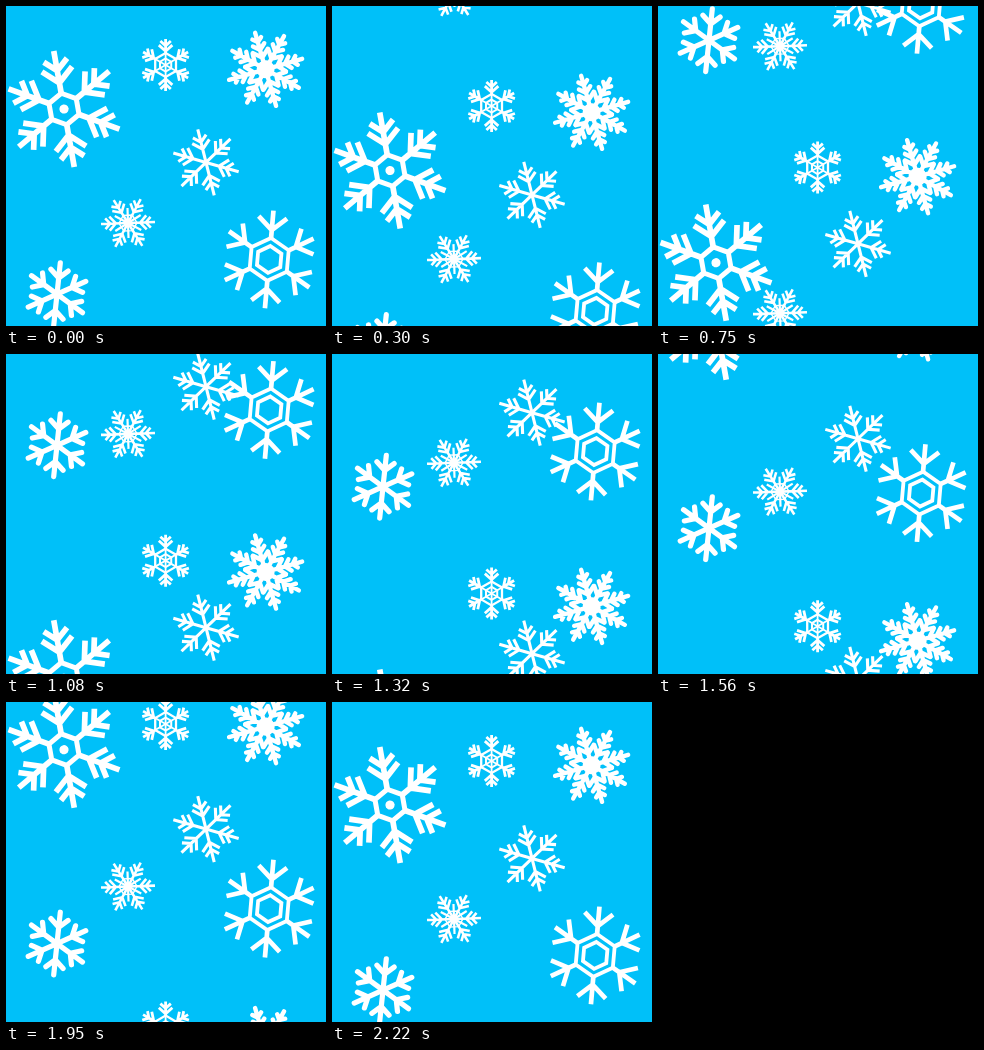
Write an HTML page that moves like this. It is 320 px wide and 320 px high and loops after 2250 ms.

```html
<!DOCTYPE html>
<html lang="en">
<head>
<meta charset="utf-8">
<title>Falling snowflakes</title>
<style>
  html, body { margin: 0; width: 100%; height: 100%; overflow: hidden; background: #00c0f9; }
  svg { display: block; width: 100%; height: 100%; }
</style>
</head>
<body>
<svg id="sky" viewBox="0 0 320 320" fill="none" stroke="#fff"></svg>
<script>
const LOOP = 2250, STEP = 30, STEPS = 74;
const SPREAD = 48 * Math.PI / 180;   // angle between trunk and side branches
const GAP = 0.21, SHRINK = 0.77;     // spacing and shortening of branch pairs

const range = n => Array.from({ length: n }, (_, i) => i);
const stroke = (d, width, turn = 0) =>
  `<path d="${d}" stroke-width="${width}" transform="rotate(${turn})"/>`;
const around = (n, d, width, turn = 0) =>
  range(n).map(i => stroke(d, width, turn + i * 360 / n)).join('');
const dot = r => `<circle r="${r}" fill="#fff" stroke="none"/>`;

function hexagon(r, width) {
  const pts = range(6).map(i => {
    const a = i * Math.PI / 3;
    return `${(r * Math.cos(a)).toFixed(2)} ${(r * Math.sin(a)).toFixed(2)}`;
  });
  return stroke(`M${pts.join('L')}Z`, width);
}

// One arm along +x; the pairs of branches start at a share of the radius.
function arm(r, { from = 0, pairs = 2, inner = 0.45, reach = 0.35 }) {
  let d = `M${from} 0H${r}`;
  for (const i of range(pairs)) {
    const start = r * (inner + i * GAP), len = r * reach * SHRINK ** i;
    const x = (start + len * Math.cos(SPREAD)).toFixed(2);
    const y = (len * Math.sin(SPREAD)).toFixed(2);
    d += `M${x} ${y}L${start.toFixed(2)} 0L${x} -${y}`;
  }
  return d;
}

const sky = document.getElementById('sky');

// fall: distance per loop, and the gap between the copies in a column.
function flake(x, y, fall, turn, r, width, style, core = '') {
  const { arms = 6, cap = 'butt' } = style;
  const art = core + around(arms, arm(r, style), width);
  const el = document.createElementNS(sky.namespaceURI, 'g');
  el.setAttribute('stroke-linecap', cap);
  el.innerHTML = [-1, 0, 1].map(k =>
    `<g transform="translate(0 ${k * fall}) rotate(${turn})">${art}</g>`).join('');
  sky.append(el);
  return { x, y, fall, el };
}

const flakes = [
  flake(58, 103, 455, -100, 59, 5.7, { from: 16 }, hexagon(16, 5) + dot(4.6)),
  flake(159.6, 59, 303.5, -90, 26, 2.8, { from: 11, inner: 0.53 },
    hexagon(12, 2.3) + hexagon(6.5, 2) + around(6, 'M0 0H12', 1.8)),
  flake(259.6, 63.3, 318, -106, 38, 4.4,
    { arms: 8, pairs: 3, inner: 0.32, reach: 0.27, cap: 'round' }, dot(9)),
  flake(200, 156.4, 241, -104, 34, 3.1, { inner: 0.4 }),
  flake(122, 217, 267, -2, 27, 2.6, {},
    dot(4) + hexagon(9, 1.4) + around(6, 'M0 0H15', 2.2, 30)),
  flake(263.2, 253.4, 384.5, -85, 49, 4.7, { from: 21, pairs: 1, inner: 0.6, reach: 0.39 },
    hexagon(21.5, 3.8) + hexagon(13.5, 3.8)),
  flake(51, 288.2, 383.5, -84, 31.5, 5.2, { pairs: 1, inner: 0.52, reach: 0.37, cap: 'round' })
];

function draw(ms) {
  const step = Math.floor((ms % LOOP) / STEP + 0.01);
  const part = (step % STEPS) / STEPS;
  for (const { x, y, fall, el } of flakes) {
    el.setAttribute('transform', `translate(${x} ${((y + part * fall) % fall).toFixed(2)})`);
  }
}

const start = performance.now();
function tick() {
  draw(performance.now() - start);
  requestAnimationFrame(tick);
}
tick();
</script>
</body>
</html>
```
